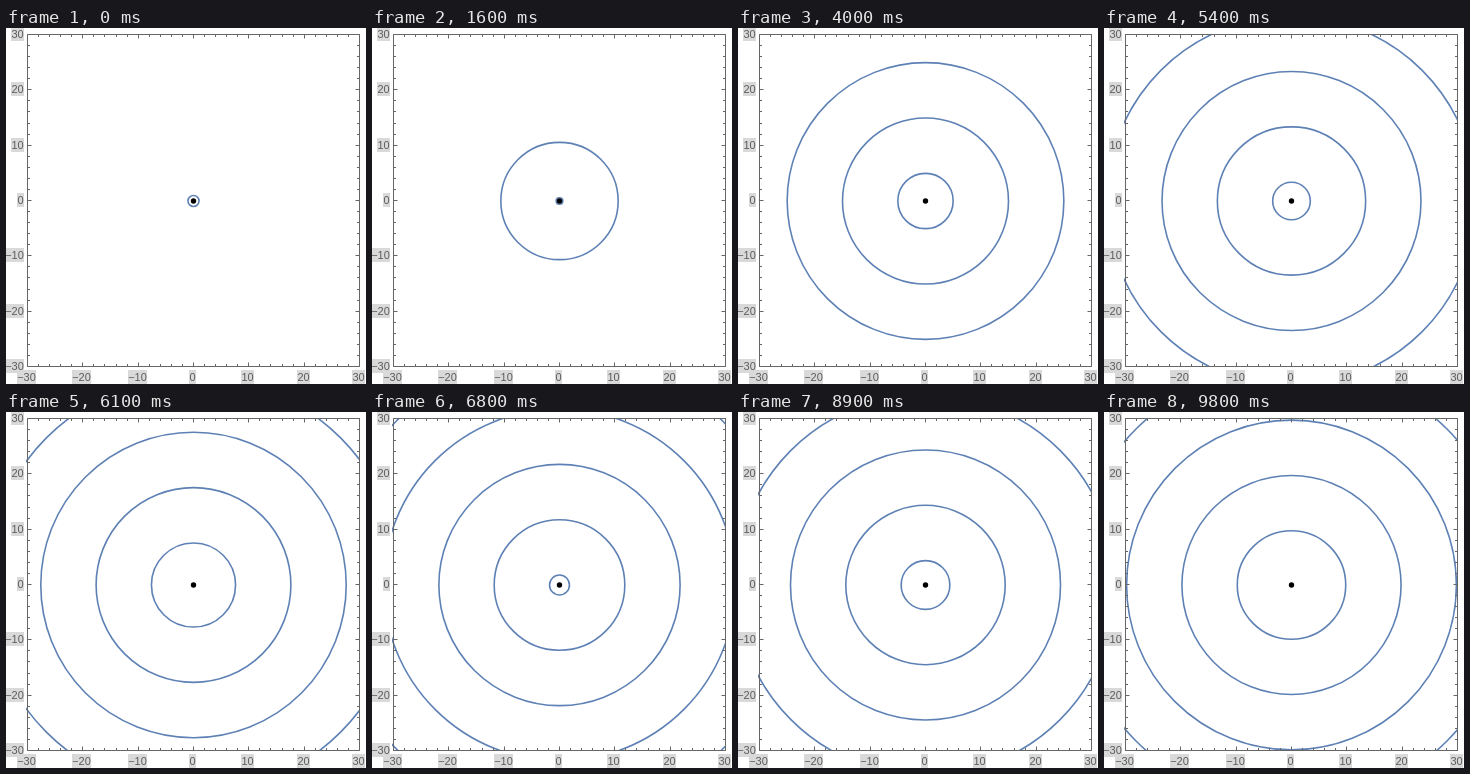
These frames come from a looping animation (360 px wide and 356 px high, 9.9 s). An HTML page with a canvas:

```html
<!DOCTYPE html>
<html lang="en">
<head>
<meta charset="utf-8">
<title>Expanding wavefronts</title>
<style>
html, body { margin: 0; width: 100%; height: 100%; overflow: hidden; background: #fff; }
canvas { display: block; }
</style>
</head>
<body>
<canvas id="plot" width="360" height="356"></canvas>
<script>
const ctx = document.getElementById("plot").getContext("2d");
const STEP_MS = 100, STEPS = 99;
const LIMIT = 30, SCALE = 166 / LIMIT;
const CENTER = { x: 187.5, y: 173 };
const FRAME = { left: 21.5, top: 6.5, size: 332 };
const GRAY = "#666666";

function line(x1, y1, x2, y2) {
  ctx.moveTo(x1, y1);
  ctx.lineTo(x2, y2);
}

function circle(radius) {
  ctx.beginPath();
  ctx.arc(CENTER.x, CENTER.y, radius, 0, Math.PI * 2);
}

function label(text, x, y, width, align) {
  const left = Math.round(align === "right" ? x - width : x - width / 2);
  ctx.fillStyle = "#d9d9d9";
  ctx.fillRect(left, y - 7, width, 14);
  ctx.fillStyle = "#5c5c5c";
  ctx.textAlign = "center";
  ctx.fillText(text, left + width / 2, y + 4);
}

function drawAxes() {
  const { left, top, size } = FRAME;
  const right = left + size, bottom = top + size;
  ctx.strokeStyle = GRAY;
  ctx.lineWidth = 1;
  ctx.beginPath();
  ctx.rect(left, top, size, size);
  for (let v = -LIMIT; v <= LIMIT; v += 2) {
    const length = v % 10 === 0 ? 4 : 2.5;
    const offset = Math.round((v + LIMIT) * SCALE);
    const x = left + offset, y = bottom - offset;
    line(x, top, x, top + length);
    line(x, bottom, x, bottom - length);
    line(left, y, left + length, y);
    line(right, y, right - length, y);
  }
  ctx.stroke();

  ctx.font = '11px "Liberation Sans", Arial, sans-serif';
  for (let v = -LIMIT; v <= LIMIT; v += 10) {
    const text = (v < 0 ? "\u2212" : "") + Math.abs(v);
    const width = v < 0 ? 19 : v === 0 ? 7 : 13;
    const offset = Math.round((v + LIMIT) * SCALE);
    label(text, left + offset - 1, 349, width, "center");
    label(text, 18, Math.round(bottom - offset - 0.5), width, "right");
  }
}

function draw(step) {
  ctx.fillStyle = "#fff";
  ctx.fillRect(0, 0, 360, 356);

  ctx.save();
  ctx.beginPath();
  ctx.rect(20, 7, 333, 331);
  ctx.clip();
  ctx.strokeStyle = "#5e81b5";
  ctx.lineWidth = 1.6;
  // A new ring leaves the center every 10 units of travel.
  for (let radius = 1 + 0.6 * step; radius > 1e-6; radius -= 10) {
    circle(radius * SCALE);
    ctx.stroke();
  }
  ctx.fillStyle = "#000";
  circle(2.7);
  ctx.fill();
  ctx.restore();

  drawAxes();
}

const start = performance.now();
function tick() {
  draw(Math.floor((performance.now() - start) / STEP_MS) % STEPS);
  requestAnimationFrame(tick);
}
tick();
</script>
</body>
</html>
```
